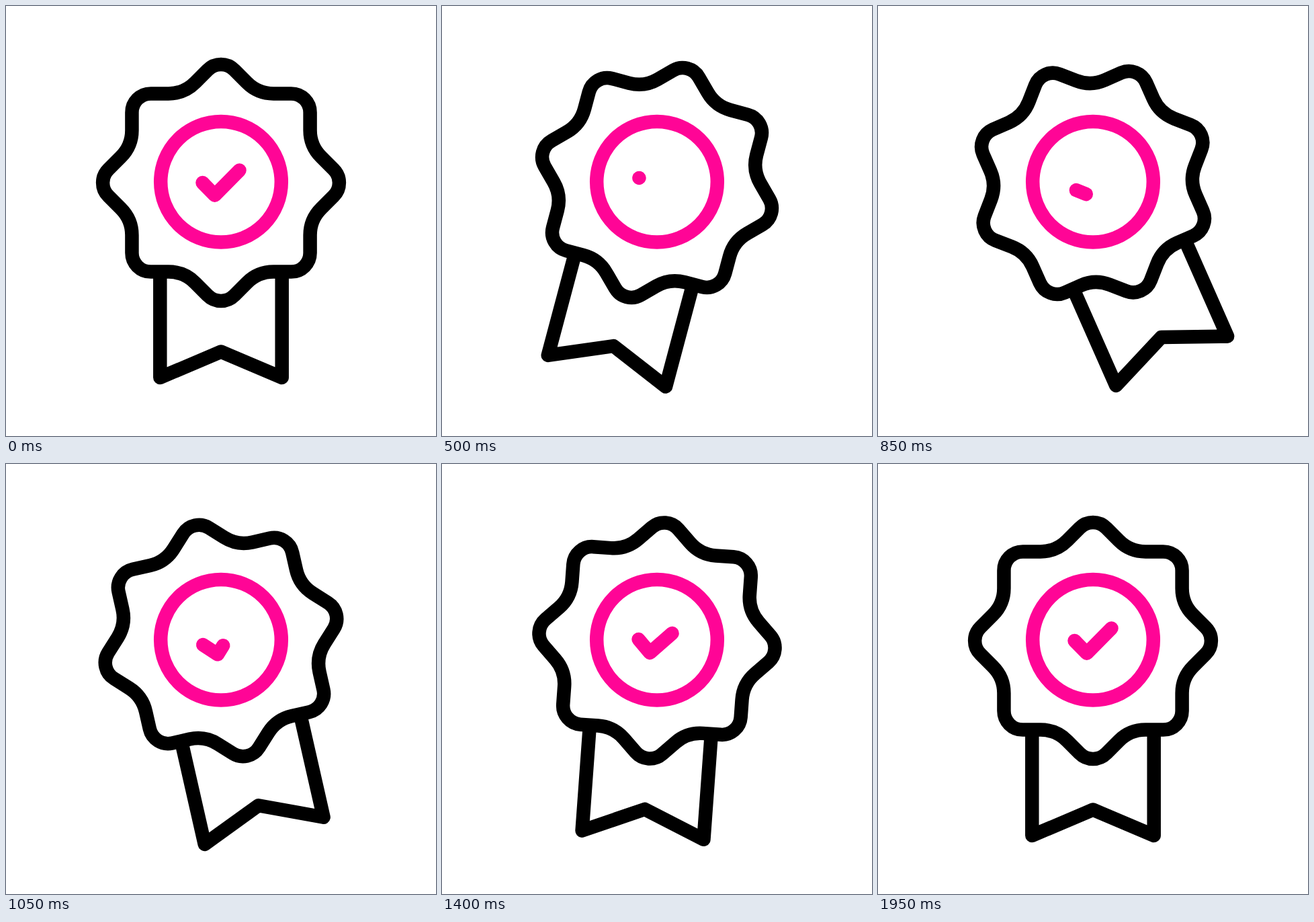
These frames come from a looping animation (640 px wide and 640 px high, 2 s). An HTML page:

```html
<!DOCTYPE html>
<html lang="en">
<head>
<meta charset="utf-8">
<title>Award badge</title>
<style>
  html, body { margin: 0; width: 100%; height: 100%; overflow: hidden; background: #fff; }
  svg { display: block; width: 100vw; height: 100vh; }
  path, circle { fill: none; stroke: #000; stroke-width: 20.5; stroke-linejoin: round; }
  .accent { stroke: #ff0596; stroke-linecap: round; }
</style>
</head>
<body>
<svg viewBox="0 0 640 640">
  <g id="badge">
    <path d="M229.3 396V553L320 514.5L410.7 553V396"/>
    <path id="rosette"/>
    <path id="check" class="accent" pathLength="100" d="M292.5 263L310.7 281.7L347.5 244.5"/>
  </g>
  <circle class="accent" cx="320" cy="261.7" r="89.8"/>
</svg>
<script>
const LOOP = 2000, STEP = 50, CX = 320, CY = 263;
const byId = id => document.getElementById(id);
const badge = byId('badge'), check = byId('check');

// Eight rounded tips joined by straight flanks and rounded valleys
function rosettePath(tip, tipR, valleyR) {
  const centre = tip - tipR, s = tipR * Math.SQRT1_2;
  const flank = centre * Math.SQRT1_2 + tipR;
  const valley = flank / Math.cos(Math.PI / 8);
  const vx = valley * Math.sin(Math.PI / 8);
  const back = valleyR * Math.tan(Math.PI / 8) * Math.SQRT1_2;
  let d = '';
  for (let i = 0; i < 8; i++) {
    const a = i * Math.PI / 4, sin = Math.sin(a), cos = Math.cos(a);
    const at = (x, y) => `${CX + x * cos + y * sin} ${CY + x * sin - y * cos}`;
    const x = vx - back, y = flank + back;
    d += `${i ? `A${valleyR} ${valleyR} 0 0 0 ` : 'M'}${at(-x, y)}`
       + `L${at(-s, centre + s)}A${tipR} ${tipR} 0 0 1 ${at(s, centre + s)}L${at(x, y)}`;
  }
  return d + `A${valleyR} ${valleyR} 0 0 0 ${d.slice(1, d.indexOf('L'))}Z`;
}

const clamp = u => Math.min(1, Math.max(0, u));
const smooth = u => u * u * (3 - 2 * u);

// Damped swing: [time, angle, bias of the ease towards this key]
const swing = [[0, 0, 1], [516, 15, 1.46], [873, -24.3, 1], [1296, 6.1, 1], [1653, -3.4, 1], [1950, 0, 1]];

function angle(t) {
  for (let i = 1; i < swing.length; i++) {
    const [t0, a0] = swing[i - 1], [t1, a1, bias] = swing[i];
    if (t < t1) return a0 + (a1 - a0) * smooth(((t - t0) / (t1 - t0)) ** bias);
  }
  return 0;
}

// The tick is wiped away, then drawn again
function tickLength(t) {
  if (t < 745) return 1 - smooth(clamp(t / 300));
  return 1 - (1 - clamp((t - 745) / 970)) ** 2;
}

function draw(now) {
  const t = Math.floor(now % LOOP / STEP) * STEP;
  badge.setAttribute('transform', `rotate(${angle(t)} ${CX} ${CY})`);
  check.setAttribute('stroke-dasharray', `${Math.max(0.01, tickLength(t) * 100)} 200`);
  requestAnimationFrame(draw);
}

byId('rosette').setAttribute('d', rosettePath(175.9, 28, 56));
draw(0);
</script>
</body>
</html>
```
